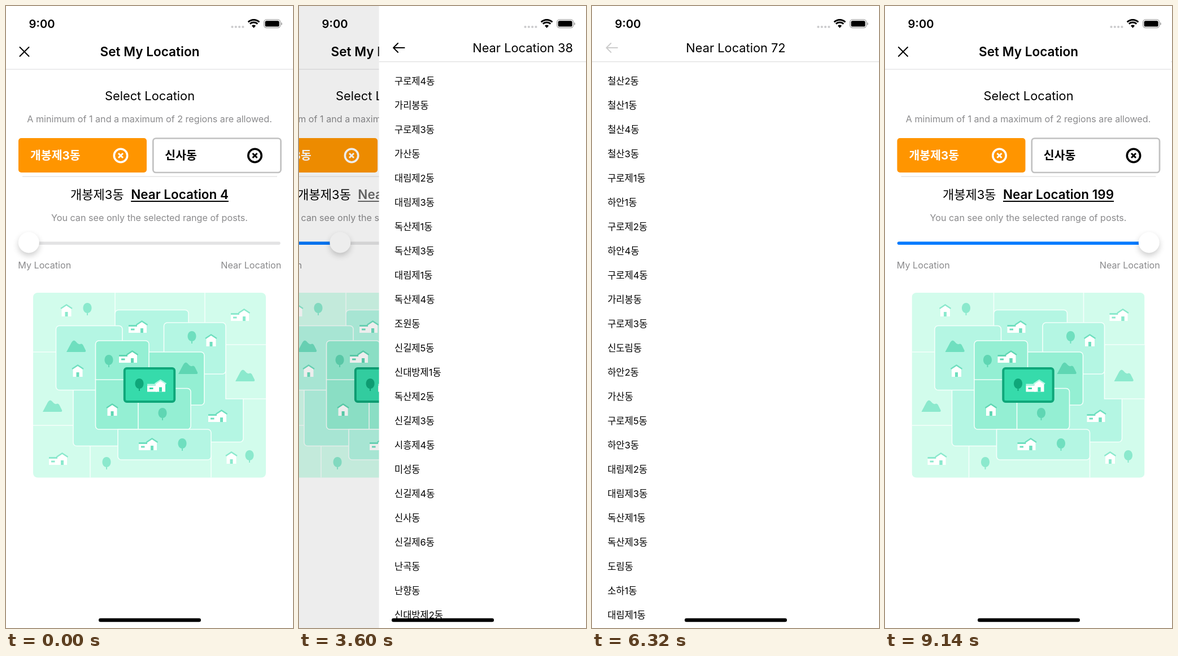
Write an HTML page with a canvas that moves like this. It is 508 by 1102 pixels and loops after 9220 ms.

```html
<!DOCTYPE html>
<html lang="ko">
<head>
<meta charset="utf-8">
<title>Set My Location</title>
<style>
  html, body { margin: 0; width: 100%; height: 100%; overflow: hidden; background: #fff; }
  canvas { display: block; width: 508px; height: 1102px; }
</style>
</head>
<body>
<canvas id="stage"></canvas>
<script>
const W = 508, H = 1102, LOOP = 9220, MOVE = 500, FADE = 250;
const FONT = 'Inter, "Noto Sans CJK KR", sans-serif';
const GREY = '#8a8a8c', BLUE = '#007aff', ORANGE = '#ff9500';

// Times in ms of each visit to the list of nearby places.
const visits = [
  { count: 4, slide: [-2, -1], label: -1, press: 1050, push: 1175, back: 2030, pop: 2125,
    names: '미성동 신사동 신림동 신원동' },
  { count: 38, slide: [2740, 2900], label: 3050, press: 3160, push: 3478, back: 4110, pop: 4238,
    names: '구로제4동 가리봉동 구로제3동 가산동 대림제2동 대림제3동 독산제1동 독산제3동 대림제1동 독산제4동 조원동 신길제5동 신대방제1동 독산제2동 신길제3동 시흥제4동 미성동 신길제4동 신사동 신길제6동 난곡동 난향동 신대방제2동' },
  { count: 72, slide: [5000, 5170], label: 5260, press: 5430, push: 5578, back: 6320, pop: 6450,
    names: '철산2동 철산1동 철산4동 철산3동 구로제1동 하안1동 구로제2동 하안4동 구로제4동 가리봉동 구로제3동 신도림동 하안2동 가산동 구로제5동 하안3동 대림제2동 대림제3동 독산제1동 독산제3동 도림동 소하1동 대림제1동' },
  { count: 199, slide: [7140, 7310], label: 7400, press: 7440, push: 7610, back: 8590, pop: 8727,
    names: '개봉제3동 광명2동 광명3동 개봉제2동 광명1동 광명4동 철산2동 광명5동 오류제2동 철산1동 오류제1동 개봉제1동 철산4동 광명6동 고척제1동 광명7동 철산3동 구로제1동 수궁동 고척제2동 하안1동 구로제2동 항동' }
];

const ctx = document.getElementById('stage').getContext('2d');
const ratio = window.devicePixelRatio || 1;
ctx.canvas.width = W * ratio;
ctx.canvas.height = H * ratio;

// ---------- timing ----------
const clamp = v => Math.max(0, Math.min(1, v));
const easeInOut = v => v < .5 ? 2 * v * v : 1 - 2 * (1 - v) * (1 - v);
const bezier = (u, a, b) => 3 * a * u * (1 - u) ** 2 + 3 * b * u * u * (1 - u) + u ** 3;

// Navigation curve: fast start, long soft landing.
function glide(x) {
  if (x <= 0) return 0;
  if (x >= 1) return 1;
  let lo = 0, hi = 1;
  for (let i = 0; i < 24; i++) {
    const mid = (lo + hi) / 2;
    if (bezier(mid, .2833, .3183) < x) lo = mid; else hi = mid;
  }
  return bezier(lo, .99, .99);
}

// Opacity of something pressed at one time and released at another.
function touch(t, press, release) {
  if (t < press) return 1;
  return .2 + .8 * easeInOut(clamp((t - release) / FADE));
}

// ---------- drawing helpers ----------
function text(str, x, y, size, { weight = 400, color = '#000', align = 'left' } = {}) {
  ctx.font = `${weight} ${size}px ${FONT}`;
  ctx.fillStyle = color;
  ctx.textAlign = align;
  ctx.fillText(str, x, y + size * .365);
}

function widthOf(str, size, weight) {
  ctx.font = `${weight} ${size}px ${FONT}`;
  return ctx.measureText(str).width;
}

function fillRect(x, y, w, h, color) {
  ctx.fillStyle = color;
  ctx.fillRect(x, y, w, h);
}

function box(x1, y1, x2, y2, r, fill, stroke, width = 1.6) {
  ctx.beginPath();
  ctx.roundRect(x1, y1, x2 - x1, y2 - y1, r);
  if (fill) { ctx.fillStyle = fill; ctx.fill(); }
  if (stroke) { ctx.strokeStyle = stroke; ctx.lineWidth = width; ctx.stroke(); }
}

function disc(x, y, r, color) {
  ctx.beginPath();
  ctx.arc(x, y, r, 0, 7);
  ctx.fillStyle = color;
  ctx.fill();
}

function trace(points) {
  ctx.beginPath();
  for (let i = 0; i < points.length; i += 2) ctx.lineTo(points[i], points[i + 1]);
}

function line(points, color, width, cap = 'butt') {
  trace(points);
  ctx.strokeStyle = color;
  ctx.lineWidth = width;
  ctx.lineCap = cap;
  ctx.lineJoin = 'miter';
  ctx.stroke();
}

function cross(x, y, r, color, width, cap) {
  line([x - r, y - r, x + r, y + r], color, width, cap);
  line([x + r, y - r, x - r, y + r], color, width, cap);
}

function at(x, y, draw) {
  ctx.save();
  ctx.translate(x, y);
  draw();
  ctx.restore();
}

// ---------- map ----------
function tree(x, y, color) {
  at(x, y, () => {
    line([0, 0, 0, 11], color, 2);
    ctx.beginPath();
    ctx.moveTo(0, -11);
    ctx.bezierCurveTo(10, -11, 10, 7, 0, 7);
    ctx.bezierCurveTo(-10, 7, -10, -11, 0, -11);
    ctx.fillStyle = color;
    ctx.fill();
  });
}

function gable(x, half, color) {
  trace([x - half, 11, x - half, -3, x, -9, x + half, -3, x + half, 11]);
  ctx.fillStyle = '#fff';
  ctx.fill();
  line([x - half - 1.5, -3, x, -9.5, x + half + 1.5, -3], color, 2.4);
  fillRect(x - 2.5, 3, 5, 8, color);
}

function house(x, y, color) {
  at(x, y, () => gable(0, 8.5, color));
}

function villa(x, y, roof, opening = roof) {
  at(x, y, () => {
    fillRect(-16, 0, 17, 11, '#fff');
    fillRect(-16, -3, 15, 3, roof);
    fillRect(-12, 3.5, 6.5, 3, opening);
    gable(7.5, 8.5, roof);
    fillRect(5, 3, 5, 8, opening);
  });
}

function hill(x, y, color) {
  at(x, y, () => {
    ctx.beginPath();
    ctx.moveTo(-17, 10);
    ctx.lineTo(-8, -7);
    ctx.quadraticCurveTo(-4, -14, 1, -7);
    ctx.quadraticCurveTo(4, -3, 7, -4);
    ctx.quadraticCurveTo(11, -6, 13, -1);
    ctx.lineTo(17, 7);
    ctx.quadraticCurveTo(18, 10, 15, 10);
    ctx.closePath();
    ctx.fillStyle = color;
    ctx.fill();
  });
}

function drawMap() {
  const outer = '#d2fcec', middle = '#b4f6e3', inner = '#94efd3', gap = '#f4fffb';
  const far = '#8be9cd', mid = '#6fdfbf', near = '#5fd6b3', core = '#0fa77a', home = '#36dbab';
  const tile = (x1, y1, x2, y2, fill) => box(x1, y1, x2, y2, 6, fill, gap);

  ctx.save();
  ctx.beginPath();
  ctx.roundRect(48, 508, 412, 327.5, 8);
  ctx.clip();
  fillRect(48, 508, 412, 328, outer);
  line([193, 508, 193, 545], gap, 1.6);
  line([352, 508, 352, 565], gap, 1.6);
  line([48, 613, 95, 613], gap, 1.6);
  line([48, 743, 125, 743], gap, 1.6);
  line([149, 770, 149, 836], gap, 1.6);
  line([363, 795, 363, 836], gap, 1.6);

  tile(193, 538.5, 323, 645, middle);
  tile(119, 640, 215, 779.5, middle);
  tile(320, 640, 420, 772.5, middle);
  box(389, 600, 470, 696, 0, outer, gap);
  tile(88.5, 566.5, 206, 680.5, middle);
  tile(279.5, 561, 389, 652, middle);
  tile(240, 613, 351, 707, inner);
  tile(158.5, 655, 240, 750, inner);
  box(234, 677.5, 327, 750, [0, 6, 6, 0], inner, gap);
  box(158.5, 593, 253, 662, [6, 6, 0, 0], inner, gap);
  box(198, 750, 363, 804, [0, 6, 6, 6], middle, gap);
  ctx.restore();

  house(107, 539, far); tree(144, 537, far); villa(414, 547, far);
  hill(423, 655, far); hill(82, 709, far); villa(92, 802, far);
  tree(178, 810, far); house(399, 800, far); tree(431, 798, far);
  villa(233, 568, mid); hill(124, 603, mid); house(127, 646, mid);
  tree(329, 587, mid); house(363, 592, mid); villa(374, 726, mid);
  villa(251, 776, mid); tree(312, 777, mid);
  villa(216, 621, near); tree(182, 629, near); hill(322, 642, near);
  house(188, 715, near); tree(277, 723, near);

  box(209.8, 642, 298.2, 701, 4, home, core, 4);
  tree(236, 671, core);
  villa(266, 672.5, '#b4f6e3', home);
}

// ---------- screens ----------
function regionButton(x1, y1, x2, y2, name, selected) {
  const color = selected ? '#fff' : '#000';
  const icon = x2 - 46;
  box(x1, y1, x2, y2, 5, selected ? ORANGE : '#fff', selected ? null : '#c1c1c1', 2.7);
  text(name, x1 + 21, 265, 20.5, { weight: 700, color });
  ctx.beginPath();
  ctx.arc(icon, 265, 11.7, 0, 7);
  ctx.strokeStyle = color;
  ctx.lineWidth = 3.6;
  ctx.stroke();
  cross(icon, 265, 4, color, 3);
}

function drawSlider(level) {
  const x = 40.3 + level * 142.5;
  line([25, 420.2, 483, 420.2], '#e3e3e4', 5.4, 'round');
  if (level > 0) line([25, 420.2, x, 420.2], BLUE, 5.4, 'round');
  ctx.save();
  ctx.shadowColor = 'rgba(0,0,0,.2)';
  ctx.shadowBlur = 11 * ratio;
  ctx.shadowOffsetY = 5 * ratio;
  disc(x, 419, 18.5, '#fff');
  ctx.restore();
}

function drawLabel(t) {
  const visit = visits.filter(v => t >= v.label).pop();
  const place = '개봉제3동', near = 'Near Location ' + visit.count;
  const size = 22, bold = 22.5, space = 12.5;
  const placeW = widthOf(place, size, 400), nearW = widthOf(near, bold, 600);
  const x = 254 - (placeW + space + nearW) / 2, nearX = x + placeW + space;
  text(place, x, 334, size);
  ctx.save();
  ctx.globalAlpha = touch(t, visit.press, visit.push);
  text(near, nearX, 334, bold, { weight: 600 });
  fillRect(nearX, 345, nearW, 2, '#000');
  ctx.restore();
}

function drawMain(t) {
  const center = { align: 'center' }, note = { align: 'center', color: GREY };
  fillRect(0, 0, W, H, '#fff');
  cross(32.5, 81, 8, '#000', 2, 'round');
  text('Set My Location', 254.5, 81, 22.6, { weight: 600, align: 'center' });
  fillRect(0, 111.5, W, 1.3, '#e4e4e5');
  text('Select Location', 254.5, 159.5, 21.8, center);
  text('A minimum of 1 and a maximum of 2 regions are allowed.', 254, 200, 16.15, note);
  regionButton(22, 234, 249, 295, '개봉제3동', true);
  regionButton(260.3, 234.5, 486.5, 295, '신사동', false);
  fillRect(29, 301.5, 451, 1.2, '#dedede');
  drawLabel(t);
  text('You can see only the selected range of posts.', 254, 375.5, 16.15, note);
  drawSlider(visits.reduce((sum, { slide: [a, b] }, i) =>
    i ? sum + easeInOut(clamp((t - a) / (b - a))) : 0, 0));
  text('My Location', 21.3, 459.5, 16.15, { color: GREY });
  text('Near Location', 487.3, 459.5, 16.15, { color: GREY, align: 'right' });
  drawMap();
}

function drawList(visit, t) {
  fillRect(0, 0, W, H, '#fff');
  ctx.save();
  ctx.globalAlpha = touch(t, visit.back, visit.pop);
  ctx.beginPath();
  ctx.moveTo(45, 74);
  ctx.lineTo(25.5, 74);
  ctx.moveTo(33.5, 66);
  ctx.lineTo(25.5, 74);
  ctx.lineTo(33.5, 82);
  ctx.strokeStyle = '#000';
  ctx.lineWidth = 2;
  ctx.lineCap = ctx.lineJoin = 'round';
  ctx.stroke();
  ctx.restore();
  text('Near Location ' + visit.count, 254.5, 74.5, 21.8, { align: 'center' });
  fillRect(0, 98, W, 1.3, '#e0e0e1');
  visit.names.split(' ').forEach((name, i) => text(name, 27.4, 132.5 + 43 * i, 16.5));
}

function drawSystem() {
  text('9:00', 63.6, 31.5, 20.2, { weight: 600, align: 'center' });
  for (let i = 0; i < 4; i++) disc(400.5 + i * 6.3, 37, 2.1, '#cbcbcd');

  for (const r of [5, 9.5, 14]) {
    ctx.beginPath();
    ctx.arc(438.5, 38.5, r, -Math.PI * .75, -Math.PI * .25);
    if (r === 5) {
      ctx.lineTo(438.5, 39);
      ctx.fillStyle = '#000';
      ctx.fill();
    } else {
      ctx.strokeStyle = '#000';
      ctx.lineWidth = 2.8;
      ctx.lineCap = 'butt';
      ctx.stroke();
    }
  }

  box(456.6, 24.2, 485.6, 38.6, 4.5, null, '#a0a0a0', 1.3);
  box(458.6, 26.2, 483.6, 36.6, 2.6, '#000');
  box(487, 29, 488.7, 34, [0, 2, 2, 0], '#a0a0a0');
  box(164, 1084.7, 345, 1091.2, 3.2, '#000');
}

function draw(t) {
  ctx.setTransform(ratio, 0, 0, ratio, 0, 0);
  const visit = visits.filter(v => t >= v.push).pop();
  const open = visit ? glide((t - visit.push) / MOVE) - glide((t - visit.pop) / MOVE) : 0;

  at(-W * .3 * open, 0, () => drawMain(t));
  if (open > 0) {
    fillRect(0, 0, W, H, `rgba(0,0,0,${open * .1})`);
    at(W * (1 - open), 0, () => drawList(visit, t));
  }
  drawSystem();
}

const start = performance.now();
function tick() {
  draw((performance.now() - start) % LOOP);
  requestAnimationFrame(tick);
}
tick();
</script>
</body>
</html>
```
